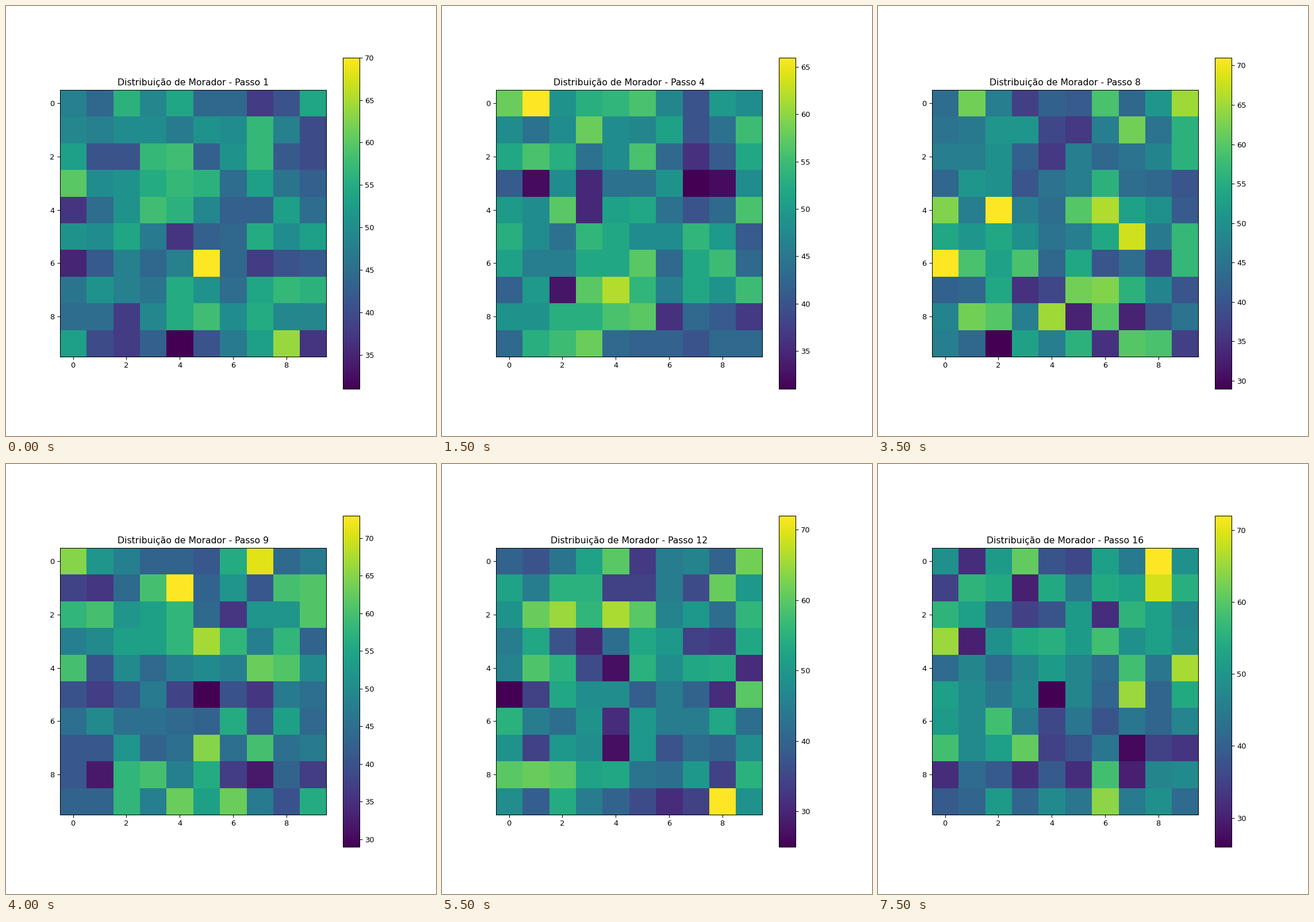
A matplotlib script that plays this animation: 748x748 px, repeating every 8000 ms.

```python
import numpy as np
import matplotlib.pyplot as plt
from matplotlib.animation import FuncAnimation

SIZE = 10
STEPS = 16
MEAN = 48

# Key points of the colour range, interpolated in between
KEY_STEPS = [1, 3, 6, 9, 11, 14, 16]
KEY_LOWS = [31, 32, 30, 29, 21, 32, 26]
KEY_HIGHS = [70, 65, 67, 73, 73, 70, 72]


def limits(step):
    """Smallest and largest population at a step."""
    return [round(np.interp(step, KEY_STEPS, keys))
            for keys in (KEY_LOWS, KEY_HIGHS)]


def population(step):
    """Residents scattered at random, fitted to the limits of the step."""
    rng = np.random.default_rng(step)
    grid = rng.poisson(MEAN, (SIZE, SIZE))
    low, high = limits(step)
    return np.interp(grid, [grid.min(), MEAN, grid.max()],
                     [low, MEAN, high]).round()


fig, ax = plt.subplots(figsize=(8, 8), dpi=93.5)
image = ax.imshow(population(1), cmap="viridis", interpolation="nearest")
fig.colorbar(image, ax=ax)
title = ax.set_title("")


def update(frame):
    step = frame + 1
    image.set_data(population(step))
    image.set_clim(*limits(step))
    title.set_text(f"Distribuição de Morador - Passo {step}")
    return image, title


anim = FuncAnimation(fig, update, frames=STEPS, interval=500,
                     repeat=True, repeat_delay=0, blit=False)
plt.show()
```
